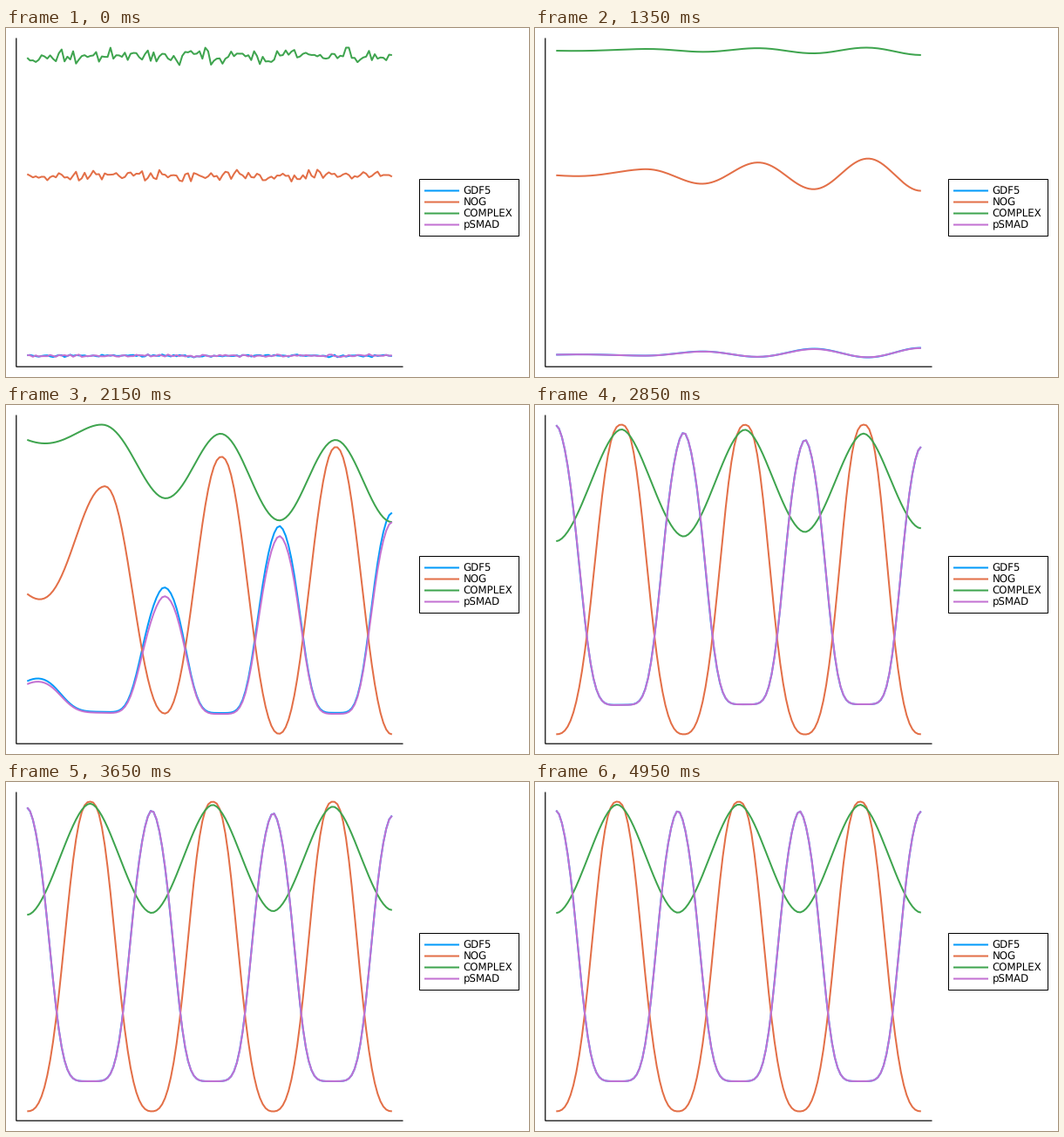
Write a matplotlib script that moves like this. It is 600 px wide and 400 px high and loops after 5.05 s.

```python
import numpy as np
import matplotlib.pyplot as plt
from matplotlib.animation import FuncAnimation
from matplotlib.patches import Rectangle

W, H, DPI = 600, 400, 100
PX = 72 / DPI  # points per pixel
TICKS, INTERVAL = 101, 50
LEFT, RIGHT, TOP, BOTTOM = 24.3, 442.8, 22.5, 377.5
POINTS, HALF_WAVES = 128, 6
ONSET, RISE, FULL = 27, 43, 57  # stages of pattern growth, in ticks
GROWTH = 0.14

x = np.linspace(LEFT, RIGHT, POINTS)
rng = np.random.default_rng(5)


def mix(a, b, w):
    return a + (b - a) * w


def phase(t):
    """Half-waves counted from the left; the crests drift left to even spacing."""
    k = np.arange(HALF_WAVES + 1)
    q = k / HALF_WAVES
    drift = np.interp(t, [ONSET, RISE, FULL, 65, 81, 99], [28, 17.5, 15, 12, 2.8, 0.4])
    lean = np.interp(t, [RISE, FULL], [0, 0.6])
    crests = mix(LEFT, RIGHT, q) + drift * (1 - q ** 2) * q ** lean
    crests[0] = LEFT
    return np.interp(x, crests, k)


def drive(q, t):
    """Exponential growth that starts at the right edge and spreads left."""
    lead = np.clip((t - 25) / 75, 0, 1)
    return (1 - (1 - lead) * (1 - q) ** 2) * np.exp(GROWTH * (t - ONSET))


def ramp(t):
    return np.clip((t - ONSET) / (RISE - ONSET), 0, 1)


def tilt(q, t):
    """Waves are taller on the left until the pattern relaxes."""
    return 0.08 * ramp(t) * np.exp(-0.09 * max(t - 62, 0)) * (0.4 - q)


def wave(ph, t, trough, crest, shape, bend, inverse=False):
    """Cosine between two envelopes, bent into its saturated shape over time."""
    c = (1 - np.cos(np.pi * ph)) / 2
    c = np.clip(1 - c if inverse else c, 0, 1)
    w = np.interp(t, [ONSET, RISE, FULL], [0, bend, 1])
    a, b, k = mix(np.array([1, 1, 0]), np.array(shape), w)
    high, low = c ** a, (1 - c) ** b * np.exp(k)
    return mix(trough, crest, high / (high + low))


def push(ph, t):
    q = ph / HALF_WAVES
    d = drive(q, t)
    return q, 0.13 * d, 0.084 * d


def ligand(t):
    ph = phase(t)
    q, up, down = push(ph, t)
    base = 374 - 31 * ramp(t) ** 2
    trough = base + 26 * up * np.exp(-up)
    crest = base - 310 * np.tanh(down * (0.2 + 1.3 * down)) * (1 + tilt(q, t))
    return wave(ph, t, trough, crest, (2.5, 0.88, 0.3), 0.8, inverse=True)


def response(t):
    return ligand(t - 0.3)


def inhibitor(t):
    ph = phase(t)
    q, up, down = push(ph, t)
    base = 168.5 - 4 * max(1 - t / ONSET, 0)
    trough = base + 209 * np.tanh(down * (1 + 6 * down ** 2))
    crest = base - 146 * np.tanh(up)
    return wave(ph, t, trough, crest, (1.25, 1.25, 0.53), 0.3)


def bound(t):
    ph = phase(t)
    q, up, down = push(ph, t)
    trough = 25.8 + 124 * np.tanh(down * (0.3 + 2.2 * down))
    crest = 25.8 - 26 * up * (1 - 1.5 * up) * np.exp(-up)
    y = wave(ph, t, trough, crest, (0.92, 0.92, 0.07), 0.3)
    return 88 + (y - 88) * (1 + 3 * tilt(q, t))


def make_noise(size):
    """Random start values that diffuse away, short wavelengths first."""
    modes = np.fft.rfft(size * np.clip(rng.standard_normal(POINTS), -2.2, 2.2))
    modes[0] = 0
    decay = 0.01 * np.arange(len(modes)) ** 2
    return lambda t: np.fft.irfft(modes * np.exp(-decay * (t - 1)), POINTS)


species = [
    ("GDF5", "#009AFA", ligand, make_noise(0.8)),
    ("NOG", "#E36F47", inhibitor, make_noise(3)),
    ("COMPLEX", "#3EA44E", bound, make_noise(4.7)),
    ("pSMAD", "#C371D2", response, make_noise(0.8)),
]

plt.rcParams["font.family"] = "DejaVu Sans"
plt.rcParams["text.hinting"] = "none"
fig = plt.figure(figsize=(W / DPI, H / DPI), dpi=DPI, facecolor="white")
ax = fig.add_axes([0, 0, 1, 1])
ax.set_xlim(0, W)
ax.set_ylim(H, 0)
ax.axis("off")

ax.plot([11.8, 11.8, 455.5], [11.5, 388.2, 388.2], color="black", lw=1.2 * PX,
        snap=False, solid_joinstyle="miter", solid_capstyle="butt")
ax.add_patch(Rectangle((474.5, 173.5), 114, 65, fc="white", ec="black", lw=PX,
                       snap=False))

lines = []
for i, (name, color, _, _) in enumerate(species):
    row = 186.5 + 13 * i
    ax.plot([480, 520], [row, row], color=color, lw=2 * PX, snap=False,
            solid_capstyle="butt")
    ax.text(524.5, row + 4.3, name, fontsize=11.8 * PX, va="baseline")
    lines += ax.plot([], [], color=color, lw=2 * PX, solid_joinstyle="round",
                     solid_capstyle="butt")


def draw(tick):
    t = min(max(tick, 1), TICKS - 2)
    curves = np.array([level(t) + noise(t) for _, _, level, noise in species])
    # the vertical scale always fits the data
    low, high = curves.min(), curves.max()
    curves = TOP + (curves - low) * (BOTTOM - TOP) / (high - low)
    for line, y in zip(lines, curves):
        line.set_data(x, y)
    return lines


anim = FuncAnimation(fig, draw, frames=TICKS, interval=INTERVAL, repeat=True,
                     repeat_delay=0)
plt.show()
```
